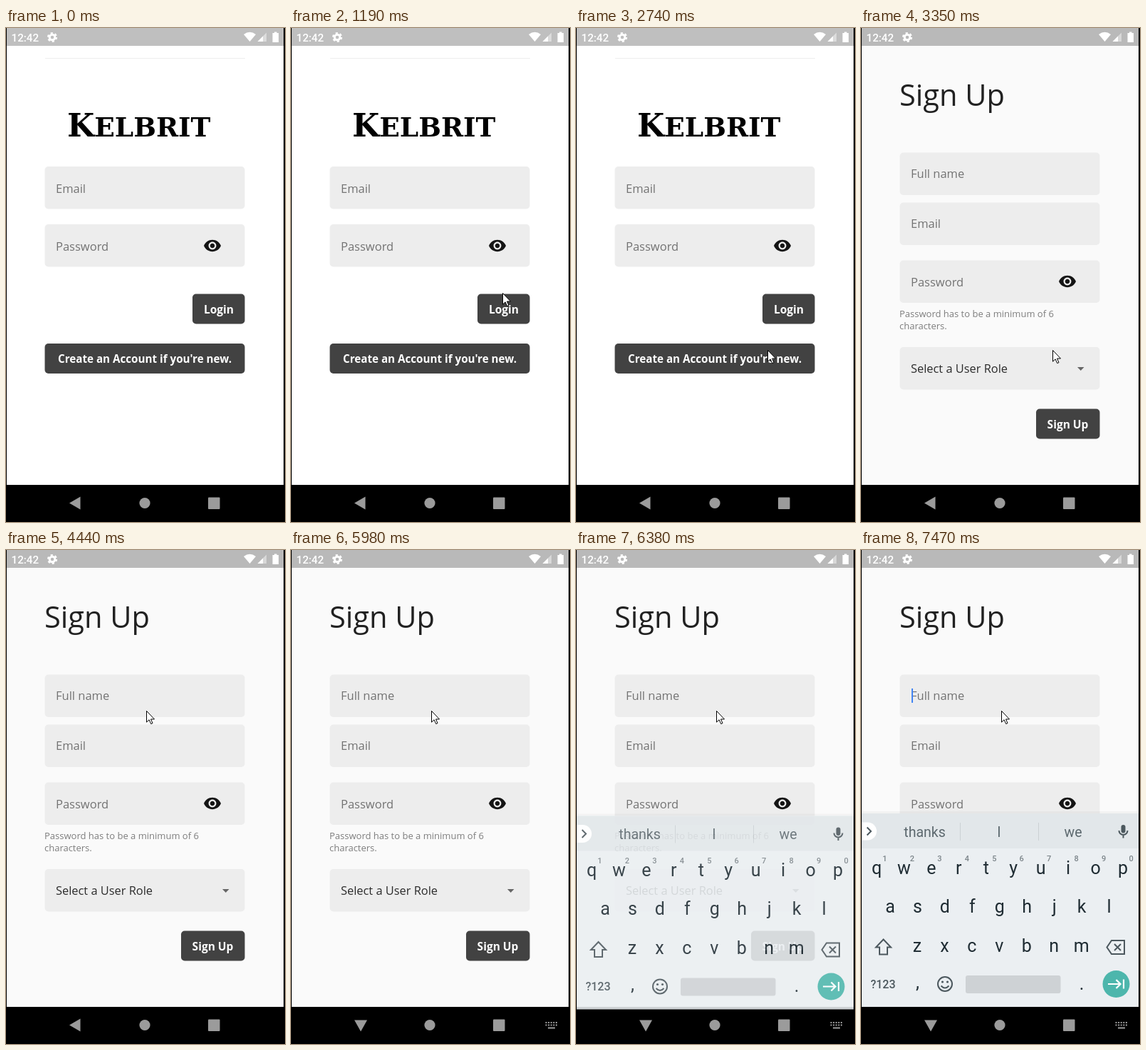
Recreate the animation shown at these times as an HTML page. Size 392 by 692 pixels, loop 8 s.

```html
<!DOCTYPE html>
<html lang="en">
<head>
<meta charset="utf-8">
<title>Sign up flow</title>
<style>
  html, body { margin: 0; height: 100%; overflow: hidden; background: #000; }
  svg { display: block; width: 100vw; height: 100vh; font-family: "Open Sans", sans-serif; }
  .field { fill: #ededed; }
  .hint { fill: #737373; font-size: 16.5px; }
  .button { fill: #424242; }
  .label { fill: #fff; font-weight: 700; font-size: 15.5px; text-anchor: middle; }
  .brand { font: 700 37.5px "DejaVu Serif", serif; }
  .roboto { font-family: Roboto, sans-serif; }
  #keyboard { font-family: Roboto, sans-serif; text-anchor: middle; fill: #1f2c33; }
  .key { font-size: 25px; }
  .digit { font-size: 11px; font-weight: 500; fill: #7b8489; }
  .word { font-size: 19.5px; fill: #5c686e; }
  .icon { fill: none; stroke: #4c585e; stroke-width: 2; }
</style>
</head>
<body>
<svg viewBox="0 0 392 692">
  <defs>
    <path id="eye" fill="#151515" transform="scale(1.09) translate(-12 -12)" d="M12 4.5C7 4.5 2.73 7.61 1 12c1.73 4.39 6 7.5 11 7.5s9.27-3.11 11-7.5c-1.73-4.39-6-7.5-11-7.5zM12 17c-2.76 0-5-2.24-5-5s2.24-5 5-5 5 2.24 5 5-2.24 5-5 5zm0-8c-1.66 0-3 1.34-3 3s1.34 3 3 3 3-1.34 3-3-1.34-3-3-3z"/>
  </defs>
  <rect width="392" height="692"/>

  <g id="login">
    <rect x="1" width="389" height="640" fill="#fff"/>
    <rect x="1" width="389" height="25" fill="#bfbfbf"/>
    <rect x="55" y="42" width="281" height="1" fill="#eee"/>
    <text class="brand" x="86" y="152"><tspan font-size="44">K</tspan>ELBRIT</text>
    <rect class="field" x="54.5" y="194" width="281" height="59.5" rx="5"/>
    <text class="hint" x="70" y="230.5">Email</text>
    <rect class="field" x="54.5" y="275" width="281" height="59.5" rx="5"/>
    <text class="hint" x="70" y="311.5">Password</text>
    <use href="#eye" x="290" y="305"/>
    <rect class="button" x="262" y="372.5" width="73.5" height="42" rx="5"/>
    <text class="label" x="299" y="399.7">Login</text>
    <rect class="button" x="54.5" y="442" width="281" height="42" rx="5"/>
    <text class="label" x="195" y="469" style="font-size:15.2px">Create an Account if you're new.</text>
  </g>

  <g id="signup">
    <rect x="1" width="389" height="640" fill="#fafafa"/>
    <rect x="1" width="389" height="25" fill="#b9b9b9"/>
    <text x="54" y="108.5" font-size="41.5" fill="#212121">Sign Up</text>
    <rect class="field" x="54.5" y="174.5" width="281" height="59.5" rx="5"/>
    <text class="hint" x="70" y="210">Full name</text>
    <rect class="field" x="54.5" y="244.5" width="281" height="59.5" rx="5"/>
    <text class="hint" x="70" y="280.3">Email</text>
    <rect class="field" x="54.5" y="325.5" width="281" height="59.5" rx="5"/>
    <text class="hint" x="70" y="361.5">Password</text>
    <use href="#eye" x="290" y="355"/>
    <text font-size="13" fill="#7d7d7d"><tspan x="54" y="404.7">Password has to be a minimum of 6</tspan><tspan x="54" y="422">characters.</tspan></text>
    <rect class="field" x="54.5" y="447" width="281" height="59.5" rx="5"/>
    <text class="hint" x="70" y="483" style="fill:#2b2b2b;font-size:16.4px">Select a User Role</text>
    <path d="M304 475h9.5l-4.75 5z" fill="#666"/>
    <rect class="button" x="246" y="533.5" width="89.5" height="42" rx="5"/>
    <text class="label" x="290.5" y="560.5">Sign Up</text>
    <rect id="caret" x="71" y="194" width="2" height="20" fill="#4285f4"/>
  </g>

  <g fill="#fff">
    <text class="roboto" x="7.5" y="18.5" font-size="15.2" font-weight="500">12:42</text>
    <g fill="none" stroke="#fff">
      <circle cx="65" cy="13" r="3.8" stroke-width="3"/>
      <circle cx="65" cy="13" r="5.9" stroke-width="2.4" stroke-dasharray="3.1 3.08"/>
    </g>
    <path d="M334 9Q342.500 2.500 351 9L342.500 19z"/>
    <path d="M353.500 19L366 6.500V19z" opacity=".45"/>
    <path d="M353.500 19L361 11.500V19z"/>
    <path d="M374.500 7h2.500v-1.500h3.500v1.500h2.500v13h-8.500z"/>
  </g>

  <g fill="#9b9b9b">
    <path id="back" d="M89 665.500L104.500 656.500V674.500z"/>
    <circle cx="195" cy="665.500" r="7.600"/>
    <rect x="284" y="657.500" width="16.500" height="16.500" rx="1"/>
    <g id="keyboardNav">
      <path d="M89 658.500H107L98 674.500z"/>
      <path d="M357.500 662H374M357.500 665.500H374" stroke="#9b9b9b" stroke-width="2" stroke-dasharray="2 1.600"/>
      <path d="M361 669.500h10" stroke="#9b9b9b" stroke-width="2"/>
    </g>
  </g>

  <g id="keyboard">
    <rect x="1" y="366" width="389" height="3" fill="#000" opacity=".03"/>
    <rect x="1" y="369" width="389" height="271" fill="#ebeff2"/>
    <rect x="1" y="369" width="389" height="49" fill="#e2e7ea"/>
    <path d="M1 381.500H9.500a12.500 12.500 0 0 1 0 25H1z" fill="#fff"/>
    <path class="icon" d="M8.500 388.500l5.500 5.500-5.500 5.500"/>
    <path d="M139.500 382v25M249.500 382v25" stroke="#cbd1d4"/>
    <text class="word" x="89.500" y="401.500">thanks</text>
    <text class="word" x="194" y="401.500">I</text>
    <text class="word" x="298" y="401.500">we</text>
    <rect x="365.500" y="385" width="6" height="11.500" rx="3" fill="#4c585e"/>
    <path class="icon" d="M362.500 393a6 6 0 0 0 12 0M368.500 399v4.500" stroke-width="1.700"/>
    <g id="keys"></g>
    <path class="icon" d="M31.500 545.500L42 556.500H37V566.500H26V556.500H21z"/>
    <path class="icon" d="M352 547H370V566H352L345.500 556.500zM356 552l9 9M365 552l-9 9"/>
    <text x="31" y="614" font-size="16" font-weight="500" fill="#4c585e">?123</text>
    <text class="key" x="79.500" y="614">,</text>
    <circle class="icon" cx="118" cy="608" r="10"/>
    <path class="icon" d="M112.500 610.500q5.500 6 11 0"/>
    <circle cx="114.500" cy="605" r="1.600" fill="#4c585e"/>
    <circle cx="121.500" cy="605" r="1.600" fill="#4c585e"/>
    <rect x="147" y="596" width="133.500" height="25" rx="3" fill="#ced2d5"/>
    <text class="key" x="310" y="616">.</text>
    <circle cx="358.500" cy="608" r="19" fill="#4db6ac"/>
    <path d="M347 608H364M358.500 602l6 6-6 6M369 601.500v13" fill="none" stroke="#fff" stroke-width="2.200"/>
  </g>

  <g id="pointer">
    <circle id="press" r="15" fill="#ff0" opacity=".47"/>
    <path d="M.5 .5V16.200L4.100 12.800L6.700 18.600L9 17.600L6.500 12H11.500z" fill="#fff" stroke="#000"/>
  </g>
</svg>
<script>
const el = id => document.getElementById(id);
const LOOP = 8000;

// Pointer moves: first step, last step, step count, end x, end y, easing power
const moves = [
  [340, 560, 4, 329, 496, 1],
  [730, 880, 3, 299, 336, 1],
  [1030, 1800, 11, 293, 417, 1.8],
  [1880, 2030, 3, 269, 451, 1],
  [3900, 4440, 8, 197, 225, 1]
];
const presses = [[2490, 2740], [4590, 4740]];
const caretSpans = [[5290, 5980], [6530, 7000], [7470, LOOP]];

const within = (t, spans) => spans.some(([from, to]) => t >= from && t < to);
const show = (id, on) => el(id).setAttribute("visibility", on ? "visible" : "hidden");

function pointerAt(t) {
  let x = 341, y = 676;
  for (const [from, to, count, endX, endY, power] of moves) {
    if (t < from) break;
    const step = Math.min(count, 1 + Math.floor((t - from) / (to - from) * (count - 1)));
    const p = step / count;
    x += (endX - x) * p;
    y += (endY - y) * (1 - (1 - p) ** power);
  }
  return [Math.round(x), Math.round(y)];
}

function buildKeys() {
  const rows = [["qwertyuiop", 22, 453.5], ["asdfghjkl", 41, 508], ["zxcvbnm", 79, 562.5]];
  const text = (type, x, y, s) => `<text class="${type}" x="${x}" y="${y}">${s}</text>`;
  el("keys").innerHTML = rows.map(([letters, left, y], row) =>
    [...letters].map((letter, i) => {
      const x = left + 38.45 * i;
      return text("key", x, y, letter) + (row ? "" : text("digit", x + 11.5, 436, (i + 1) % 10));
    }).join("")).join("");
}

function draw(now) {
  const t = now % LOOP;
  show("login", t < 3350);
  show("signup", t >= 3350);
  show("caret", within(t, caretSpans));
  show("back", t < 5450);
  show("keyboardNav", t >= 5450);

  const step = Math.floor((t - 6290) / 80);
  show("keyboard", step >= 0);
  if (step >= 0) {
    const drop = step < 3 ? 41 * 0.085 ** step : 0;
    el("keyboard").setAttribute("transform", `translate(0 ${drop})`);
    el("keyboard").setAttribute("opacity", 1 - 0.6 * 0.2 ** step);
  }

  show("pointer", t >= 340);
  show("press", within(t, presses));
  el("pointer").setAttribute("transform", `translate(${pointerAt(t)})`);
  requestAnimationFrame(() => draw(performance.now()));
}

buildKeys();
draw(performance.now());
</script>
</body>
</html>
```
